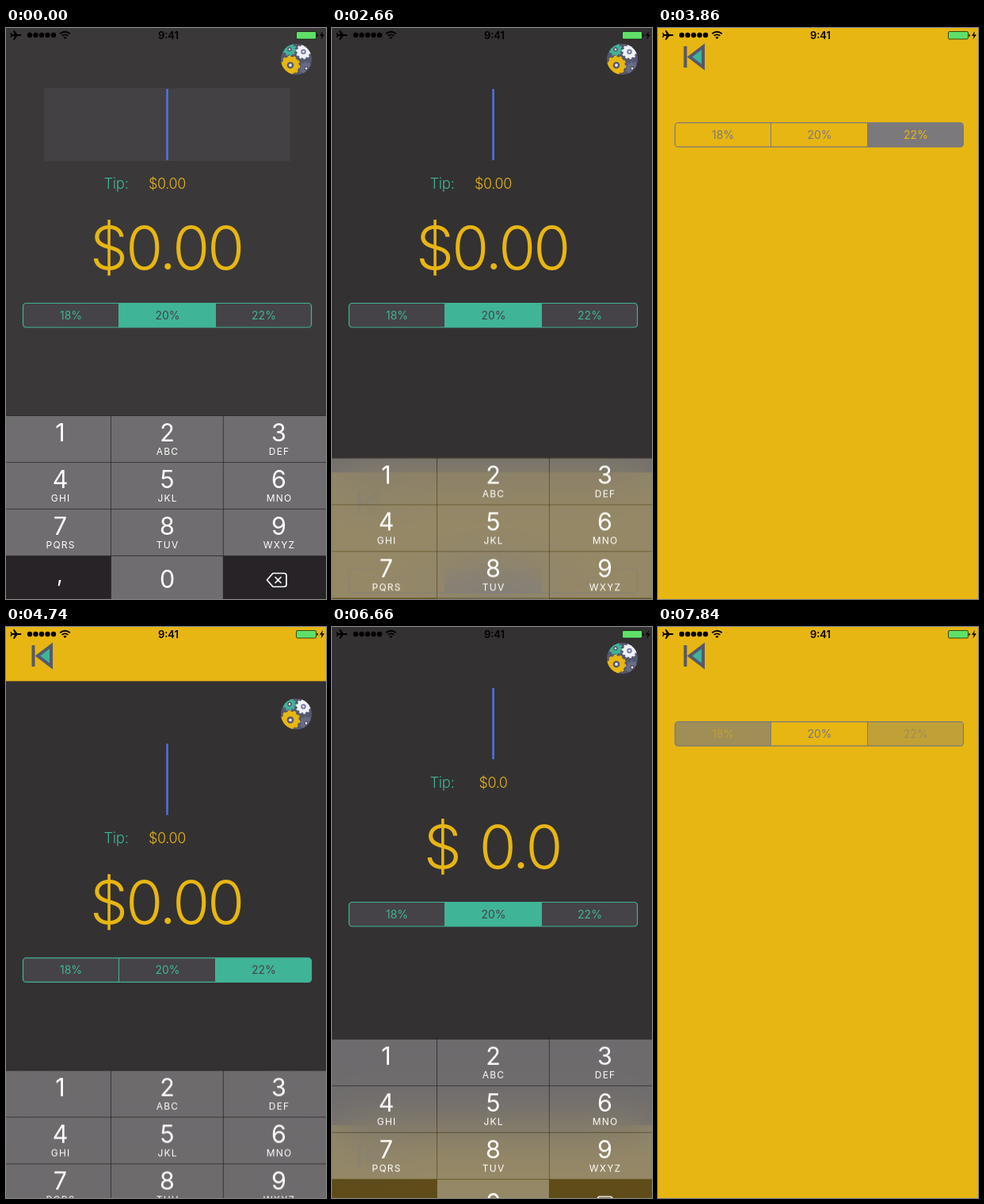
An HTML page that plays this animation: 404x721 px, repeating every 7.99 s.

```html
<!DOCTYPE html>
<html lang="en">
<head>
<meta charset="utf-8">
<title>Tip calculator</title>
<style>
  html, body { margin: 0; width: 100%; height: 100%; overflow: hidden; background: #343133; }
  body { position: relative; font-family: Inter, Roboto, sans-serif; }
  svg { display: block; overflow: visible; }
  .layer { position: absolute; left: 0; top: 0; width: 404px; }
  #keys { top: 489px; height: 232px; z-index: 4; background: rgba(31, 26, 31, .676); backdrop-filter: blur(32px); }
  #status { z-index: 5; }
  text { text-anchor: middle; }
  .light { font-weight: 300; }
</style>
</head>
<body>
<script>
const W = 404, H = 721, LOOP = 7990;
const TEAL = '#40b496', GOLD = '#e7b612', SLATE = '#555870', GREY = '#7b797c', PANEL = '#454347';

const clamp = x => Math.min(1, Math.max(0, x));
const ramp = (t, from, to) => clamp((t - from) / (to - from));
const $ = id => document.getElementById(id);

const text = (x, y, size, fill, str, extra = '') =>
  `<text x="${x}" y="${y}" font-size="${size}" fill="${fill}" ${extra}>${str}</text>`;

function svg(id, body, height = H) {
  return `<svg id="${id}" class="layer" width="${W}" height="${height}" viewBox="0 0 ${W} ${height}">${body}</svg>`;
}

// The backdrop of a screen reaches slightly above its content.
const backdrop = (id, fill) => `<rect id="${id}" y="-2" width="${W}" height="${H + 2}" fill="${fill}"/>`;

// Segmented control: each segment has a plain label and a selected state on top.
function segments(id, y, color, back, inside) {
  const edges = [21.5, 142.5, 264.5, 385.5], centers = [82, 204, 325.5];
  const clip = `${id}Clip`;
  const box = `x="21.5" y="${y}" width="364" height="30.5" rx="4"`;
  const label = (i, fill) => text(centers[i], y + 20.4, 14, fill, `${18 + 2 * i}%`);
  let out = `<clipPath id="${clip}"><rect ${box}/></clipPath><rect ${box} fill="${inside}"/>`;
  for (let i = 0; i < 3; i++) {
    out += label(i, color) + `<g id="${id}${i}" clip-path="url(#${clip})">` +
      `<rect x="${edges[i]}" y="${y}" width="${edges[i + 1] - edges[i]}" height="31" fill="${color}"/>${label(i, back)}</g>`;
  }
  return out + `<path d="M142.5 ${y}v30.5M264.5 ${y}v30.5" stroke="${color}"/>` +
    `<rect ${box} fill="none" stroke="${color}" stroke-width="1.2"/>`;
}

function gear(x, y, r, color, hub) {
  const tooth = 2 * Math.PI * r / 20;
  return `<g transform="translate(${x} ${y})"><circle r="${r}" fill="${color}"/>` +
    `<circle r="${r}" fill="none" stroke="${color}" stroke-width="3" stroke-dasharray="${tooth}"/>` +
    `<circle r="${r * .4}" fill="${hub}"/><circle r="${r * .18}" fill="#e8e8ee"/></g>`;
}

const gears = `<clipPath id="disc"><circle cx="366.5" cy="39.5" r="19.5"/></clipPath>
  <g clip-path="url(#disc)"><rect x="346" y="19" width="41" height="41" fill="${SLATE}"/>
  ${gear(379, 51, 7, '#686b84', SLATE)}${gear(358, 27, 7, TEAL, SLATE)}
  ${gear(375.5, 30, 8, '#f0f0f5', '#7076a0')}${gear(359, 47, 10.8, GOLD, SLATE)}</g>`;

const main = `${backdrop('back', '#343133')}
  <g fill="#fff" fill-opacity=".045">
    <rect id="fieldLeft" x="48" y="76" width="153" height="92"/>
    <rect id="fieldRight" x="201" y="76" width="158" height="92"/></g>
  <rect id="caret" x="202.3" y="77" width="2.5" height="90" fill="#4f74e3"/>
  ${gears}
  ${text(139, 202.5, 18.5, TEAL, 'Tip:', 'class="light" letter-spacing="-.3"')}
  ${text(203.5, 202.5, 18, GOLD, '', 'id="tip" class="light" letter-spacing="-.4"')}
  ${text(202.3, 304.6, 76, GOLD, '', 'id="total" class="light" letter-spacing="-2.8" word-spacing="6"')}
  ${segments('rate', 347.5, TEAL, PANEL, PANEL)}`;

const settings = `${backdrop('sheet', GOLD)}
  <rect x="32.5" y="23" width="4" height="27" fill="${SLATE}"/>
  <path d="M57 23.5V49.5L40 36.5Z" fill="${TEAL}" stroke="${SLATE}" stroke-width="4"/>
  ${segments('base', 119.7, GREY, GOLD, 'none')}`;

function keypad() {
  const cols = [[0, 132.2, 68.5], [132.9, 141, 203.5], [274.6, 129.4, 344.5]];
  const letters = ['', 'ABC', 'DEF', 'GHI', 'JKL', 'MNO', 'PQRS', 'TUV', 'WXYZ'];
  const key = (col, y) => `<rect x="${col[0]}" y="${y}" width="${col[1]}" height="58.3" fill="#fff" fill-opacity=".336"/>`;
  const digit = (x, y, d) => text(x, y, 30.5, '#fff', d, 'font-weight="400"');
  let out = key(cols[1], 178) + digit(203.5, 218.4, 0) + text(68, 211, 27, '#fff', ',');
  letters.forEach((str, i) => {
    const col = cols[i % 3], y = 59 * Math.floor(i / 3);
    out += key(col, y + .9) + digit(col[2], y + 33.4, i + 1) +
      text(col[2] + .6, y + 50, 12, '#fff', str, 'letter-spacing="1.2"');
  });
  return out + `<path d="M337 199.5h14q3 0 3 3v11q0 3-3 3h-14l-7.5-8.5zM339.5 204l8 8m0-8l-8 8"
    fill="none" stroke="#fff" stroke-width="1.7" stroke-linejoin="round"/>`;
}

const dots = [30, 37.5, 45, 52.5, 60].map(x => `<circle cx="${x}" cy="9" r="3.2"/>`).join('');
const status = `<path d="M19.5 9q0-1-1.5-1h-3.6L10.5 3H9l1.8 5H8L6.5 6H5.5l.8 3-.8 3h1L8 10h2.8L9 15h1.5l3.9-5H18q1.5 0 1.5-1z"/>
  ${dots}
  <g fill="none" stroke="#000" stroke-width="1.8"><path d="M68.2 7.2q6.3-5 12.6 0M70.6 9.8q3.9-3 7.8 0"/></g>
  <path d="M72.3 11.7q2.2-1.6 4.4 0L74.5 14z"/>
  ${text(205, 14, 13, '#000', '9:41', 'font-weight="600"')}
  <rect x="366.5" y="4.5" width="25" height="9.5" rx="1.5" fill="#5fe069" stroke="#000" stroke-opacity=".65"/>
  <path d="M392.5 7.5q1.5 0 1.5 1.8t-1.5 1.8zM400 4l-4 5.8h2.6L397.6 14.5l4.4-6.2h-2.8z"/>`;

document.body.innerHTML = svg('main', main) + svg('settings', settings) +
  `<div id="keys" class="layer">${svg('pad', keypad(), 232)}</div>` + svg('status', status, 20);

// Critically damped spring used by all the screen changes.
function spring(ms) {
  const x = .014 * Math.max(0, ms);
  return 1 - (1 + x) * Math.exp(-x);
}

function blink(t, start, period) {
  if (t < start) return 1;
  const p = (t - start) % period;
  return p < 390 ? 1 - ramp(p, 0, 150) : ramp(p, 390, 540);
}

function select(id, from, to, k) {
  for (let i = 0; i < 3; i++) $(id + i).style.opacity = i === to ? k : i === from ? 1 - k : 0;
}

const move = (id, y) => { $(id).style.transform = `translateY(${y}px)`; };

function render(t) {
  const second = t >= 4461, leaving = !second || t >= 6600;
  const opened = spring(t - (second ? 6617 : 2598));
  const mainY = leaving ? 0 : H * (1 - spring(t - 4461));
  move('main', mainY);
  move('settings', leaving ? (H + 2) * (1 - opened) : 0);
  move('keys', leaving ? 242 * opened : mainY);
  $('main').style.zIndex = leaving ? 1 : 3;
  $('settings').style.zIndex = 2;

  $('back').setAttribute('fill', t < 150 ? '#3b383a' : t < 300 ? '#373436' : '#343133');
  $('fieldLeft').style.opacity = t < 300 ? 1 : 0;
  $('fieldRight').style.opacity = t < 1930 ? 1 : 0;
  $('caret').style.opacity = second ? blink(t, 5600, 1150) : blink(t, 60, 875);

  const edited = t >= 5620;
  $('tip').textContent = edited ? '$0.0' : '$0.00';
  $('total').textContent = edited ? '$ 0.0' : '$0.00';

  if (second) select('rate', 2, 1, ramp(t, 5600, 6000));
  else select('rate', 1, 1, 1);
  if (t < 6000) select('base', 1, 2, ramp(t, 3440, 3860));
  else select('base', 2, 0, ramp(t, 7540, 8000));
}

const began = performance.now();
function frame() {
  render((performance.now() - began) % LOOP);
  requestAnimationFrame(frame);
}
frame();
</script>
</body>
</html>
```
